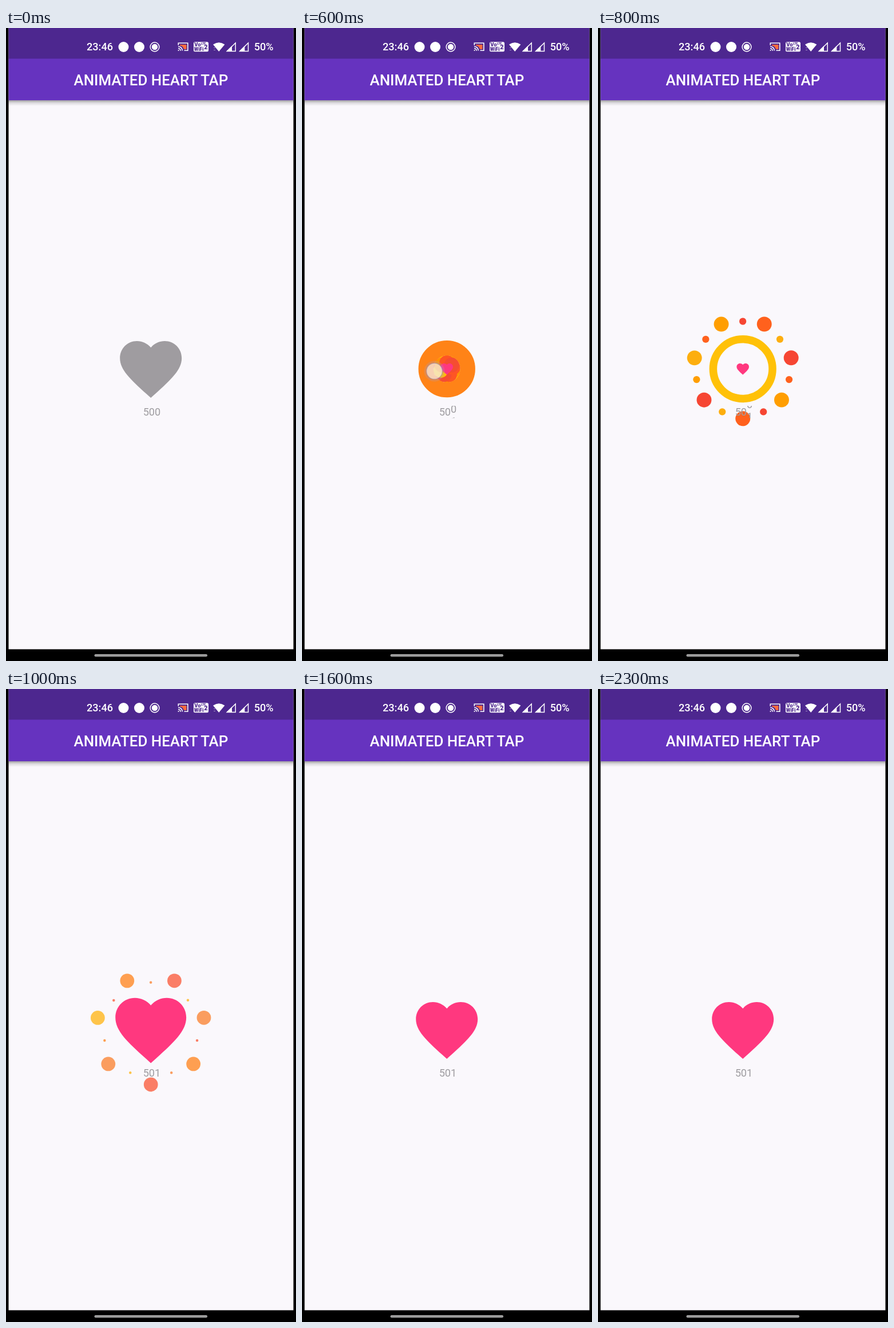
An HTML page for the animation above (2.4 s loop, 507 by 1104 pixels).

```html
<!DOCTYPE html>
<html lang="en">
<head>
<meta charset="utf-8">
<title>Animated heart tap</title>
<style>
  html, body { margin: 0; width: 100%; height: 100%; overflow: hidden; background: #000; }
  svg { display: block; width: 100vw; height: 100vh; }
  text { font-family: Roboto, sans-serif; }
  .bar { font-weight: 500; fill: #fff; }
  .count { font-size: 18.14px; fill: #9e9ca0; }
  .badge { font-weight: 900; fill: #4d278f; }
</style>
</head>
<body>
<svg viewBox="0 0 507 1104">
  <defs>
    <linearGradient id="shade" x1="0" y1="0" x2="0" y2="1">
      <stop offset="0" stop-color="#000" stop-opacity=".36"/>
      <stop offset=".45" stop-color="#000" stop-opacity=".12"/>
      <stop offset="1" stop-color="#000" stop-opacity="0"/>
    </linearGradient>
    <clipPath id="slot"><rect x="238" y="659" width="36" height="21.3"/></clipPath>
  </defs>

  <rect width="507" height="1104"/>
  <rect x="4.5" y="0" width="498" height="1083.5" fill="#faf8fc"/>
  <rect x="4.5" y="126" width="498" height="10" fill="url(#shade)"/>
  <rect x="4.5" y="53" width="498" height="73" fill="#6633bf"/>
  <rect x="4.5" y="0" width="498" height="53.5" fill="#4d278f"/>
  <rect x="154.5" y="1092" width="197.5" height="4.5" rx="2.2" fill="#9c9c9c"/>
  <text class="bar" x="253.4" y="99.6" font-size="25.92" text-anchor="middle">ANIMATED HEART TAP</text>

  <!-- status bar -->
  <g fill="#fff">
    <text class="bar" x="141" y="39.3" font-size="18.14">23:46</text>
    <circle cx="205.5" cy="33" r="9"/>
    <circle cx="233" cy="33" r="9"/>
    <circle cx="260" cy="33" r="7.9" fill="none" stroke="#fff" stroke-width="1.5"/>
    <circle cx="260" cy="33" r="5.2"/>
    <g fill="none" stroke="#fff" stroke-width="1.6">
      <path d="M301.3 30V26.3H317.8V39.3H311.5" />
      <path d="M304 29H315.5V37H311Q309.500 31.500 304 30.500Z" fill="#ff6a3c" stroke="none"/>
      <path d="M301 32.200A7.400 7.400 0 0 1 308.400 39.600M301 35.500A4.200 4.200 0 0 1 305.200 39.700"/>
    </g>
    <circle cx="301.600" cy="39" r="1.100"/>
    <rect x="328" y="24.300" width="26" height="17" rx="2.500"/>
    <g class="badge">
      <text x="329.300" y="32.400" font-size="9.500">Vo</text>
      <text x="341" y="29" font-size="5">LTE</text>
      <text x="328.800" y="40.200" font-size="8.500">WiFi</text>
      <text x="346.200" y="37.200" font-size="11">2</text>
    </g>
    <path d="M362 28.800Q372.200 21.600 382.400 28.800L372.200 41Z"/>
    <path d="M363 34.500h3M363 38.500h3" stroke="#fff" stroke-opacity=".45"/>
    <g id="signal">
      <path d="M386.500 40.400H401.200V26Z" fill="none" stroke="#fff" stroke-width="1.500"/>
      <path d="M385 41L395 31V41Z"/>
    </g>
    <use href="#signal" x="22.300"/>
    <text class="bar" x="433.700" y="39.300" font-size="18.140">50%</text>
  </g>

  <g id="bubbles"></g>
  <circle id="ring" cx="253.200" cy="594.600" fill="none"/>
  <path id="heart" d="M12 21.350l-1.450-1.320C5.400 15.360 2 12.280 2 8.500 2 5.420 4.420 3 7.500 3c1.740 0 3.410.810 4.500 2.090C13.090 3.810 14.760 3 16.500 3 19.580 3 22 5.420 22 8.500c0 3.780-3.400 6.860-8.550 11.540L12 21.350z"/>

  <g class="count" clip-path="url(#slot)">
    <text x="239.700" y="676.200">50</text>
    <g id="digits">
      <text x="260.100" y="676.200">0</text>
      <text x="260.100" y="697.400">1</text>
    </g>
  </g>

  <g id="touch">
    <circle r="18" fill="#a79fc8" fill-opacity=".28"/>
    <circle r="14" fill="#fff" fill-opacity=".68" stroke="#8f86b4" stroke-opacity=".6" stroke-width="1.400"/>
  </g>
</svg>

<script>
const LOOP = 2400, STEP = 100, TAP = 482, POP = 1000, ROLL = 500;
const CX = 253.2, CY = 594.6, SIZE = 129.6, LINE = 21.2;
const AMBER = [255, 193, 7], ORANGE = [255, 152, 0], DEEP = [255, 87, 34], RED = [244, 67, 54];
const DOTS = [AMBER, ORANGE, DEEP, RED];
const COUNT = 7, ANGLE = 51.42;

const $ = id => document.getElementById(id);
const set = (el, attrs) => { for (const k in attrs) el.setAttribute(k, attrs[k]); };
const clamp = (v, a = 0, b = 1) => Math.min(b, Math.max(a, v));
const mix = (a, b, p) => a + (b - a) * p;
const span = (v, a, b) => clamp((v - a) / (b - a));
const rgb = (a, b, p) => `rgb(${a.map((c, i) => Math.round(mix(c, b[i], p)))})`;

// cubic-bezier(.25, .1, .25, 1)
function ease(x) {
  const bez = (a, b, u) => 3 * a * u * (1 - u) ** 2 + 3 * b * u * u * (1 - u) + u ** 3;
  let lo = 0, hi = 1;
  for (let i = 0; i < 24; i++) {
    const mid = (lo + hi) / 2;
    if (bez(.25, .25, mid) < x) lo = mid; else hi = mid;
  }
  return bez(.1, 1, lo);
}
const overshoot = x => (x - 1) ** 2 * (3.5 * (x - 1) + 2.5) + 1;
const decelerate = x => 1 - (1 - x) ** 2;

const dots = Array.from({ length: COUNT * 2 }, () =>
  $('bubbles').appendChild(document.createElementNS('http://www.w3.org/2000/svg', 'circle')));

function drawBubbles(t) {
  const p = decelerate(span(t, .1, 1));
  const big = SIZE * .1, far = SIZE - big * 2, near = far * .8;
  const shift = p < .5 ? 0 : 1;
  const outer = {
    dist: p < .3 ? mix(0, near, p / .3) : mix(near, far, span(p, .3, 1)),
    r: big * (1 - span(p, .7, 1)), turn: ANGLE * .75, hue: 0
  };
  const inner = {
    dist: near * span(p, 0, .3),
    r: big * (p < .5 ? mix(1, .3, span(p, .2, .5)) : mix(.3, 0, span(p, .5, 1))),
    turn: ANGLE * .25, hue: 1
  };
  $('bubbles').setAttribute('visibility', p > 0 && p < 1 ? 'visible' : 'hidden');
  dots.forEach((dot, n) => {
    const i = n >> 1, ring = n % 2 ? inner : outer;
    const a = (ring.turn + ANGLE * i) * Math.PI / 180;
    const hue = (i + ring.hue) % 4 + shift;
    set(dot, {
      cx: CX + ring.dist * Math.cos(a), cy: CY + ring.dist * Math.sin(a), r: ring.r,
      fill: rgb(DOTS[hue % 4], DOTS[(hue + 1) % 4], p * 2 - shift),
      'fill-opacity': 1 - span(p, .6, 1)
    });
  });
}

function drawRing(t) {
  const half = SIZE * .4;
  const outer = mix(.1, 1, ease(span(t, 0, .3)));
  const inner = mix(.2, 1, ease(span(t, .2, .5)));
  const width = Math.max(0, outer - inner) * half;
  set($('ring'), {
    r: outer * half, 'stroke-width': width,
    stroke: width > .01 ? rgb(DEEP, AMBER, span(outer, .5, 1)) : 'none'
  });
}

function drawHeart(t) {
  const s = t < 0 || t >= 1 ? 1 : mix(.2, 1, overshoot(span(t, .35, .7)));
  set($('heart'), {
    fill: t < 0 ? '#9f9ca0' : '#ff387f',
    transform: `translate(${CX} ${CY}) scale(${s * SIZE / 24}) translate(-12 -12)`
  });
}

function drawTouch(now) {
  const p = span(now, 400, 500);
  set($('touch'), {
    visibility: now > 350 && now < 650 ? 'visible' : 'hidden',
    opacity: mix(1, .9, span(now, 500, 600)),
    transform: `translate(${mix(240.5, 231.5, p)} ${mix(605.5, 598.5, p)})`
  });
}

function draw(now) {
  const t = (now - TAP) / POP;
  drawBubbles(t);
  drawRing(t);
  drawHeart(t);
  drawTouch(now);
  set($('digits'), { transform: `translate(0 ${-LINE * span(now, TAP, TAP + ROLL)})` });
}

const start = performance.now();
function tick() {
  const now = (performance.now() - start) % LOOP;
  draw(Math.floor((now + 2) / STEP) * STEP % LOOP);
  requestAnimationFrame(tick);
}
tick();
</script>
</body>
</html>
```
